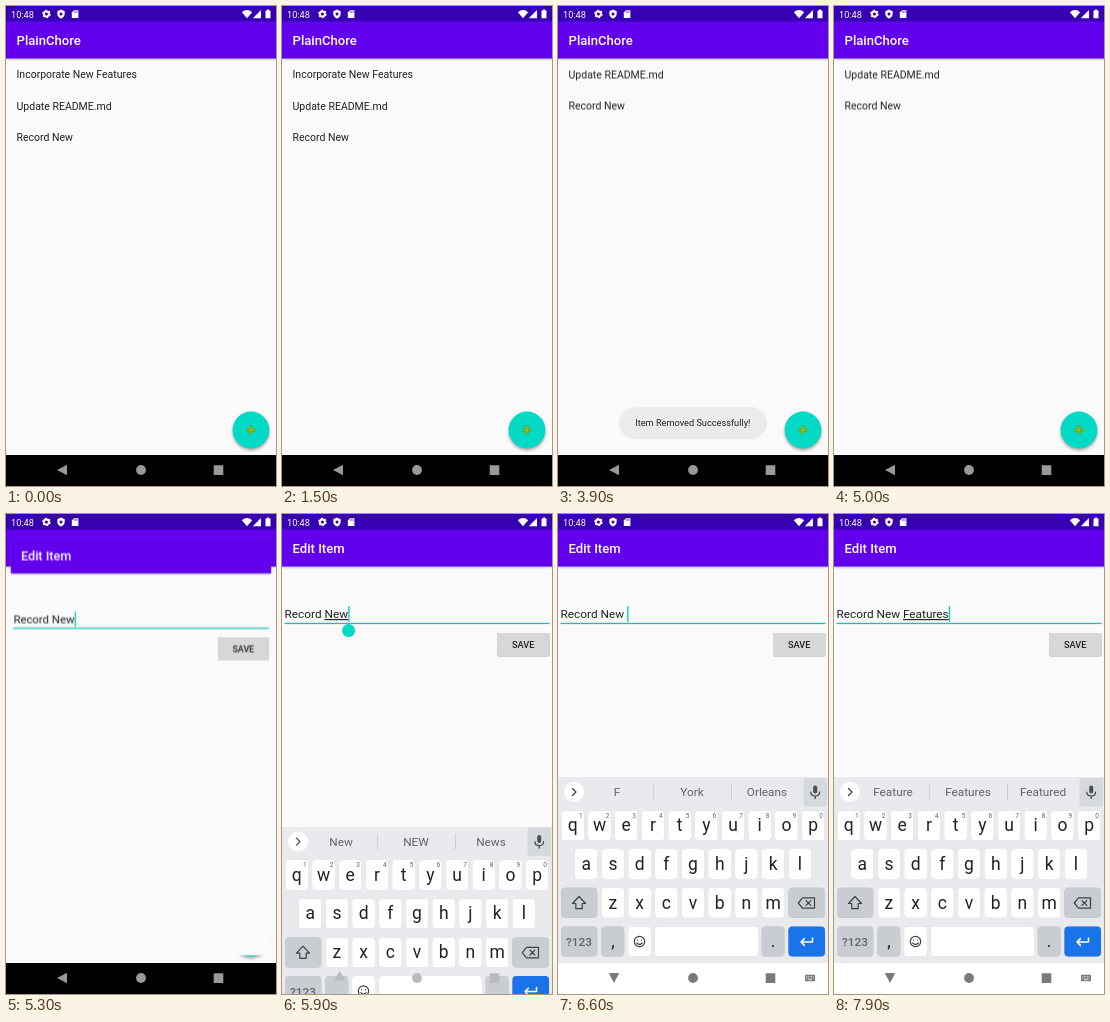
These frames come from a looping animation (270 px wide and 480 px high, 8000 ms). An HTML page:

```html
<!DOCTYPE html>
<html lang="en">
<head>
<meta charset="utf-8">
<title>Todo demo</title>
<style>
  html, body { margin: 0; width: 100%; height: 100%; overflow: hidden; background: #fafafa; }
  svg { display: block; width: 100%; height: 100%; font-family: Roboto, sans-serif; }
  text { white-space: pre; }
  .mid { text-anchor: middle; }
  .bar { filter: drop-shadow(0 1px 1px #0004); }
  .title { font-size: 13.1px; font-weight: 500; fill: #fff; }
  .rows { font-size: 10.5px; fill: #212121; }
  .letter { font-size: 17.5px; fill: #202124; }
  .hint { font-size: 6.5px; fill: #5f6368; }
  .suggest { font-size: 11.8px; fill: #5f6368; }
  .key { filter: drop-shadow(0 .7px .2px #0003); }
  .line { fill: none; stroke: #3c4043; stroke-width: 1.2; stroke-linejoin: round; stroke-linecap: round; }

  .first, .rest, .toast, .edit, .handle, .keyboard, .nav, .back, .switch {
    animation: 8s linear infinite;
  }
  .first { animation-name: first; }
  .rest { animation-name: rest; }
  .toast { animation-name: toast; }
  .edit { animation-name: edit; transform-origin: 135px 240px; }
  .handle { animation-name: handle; }
  .keyboard { animation-name: keyboard; }
  .nav { animation-name: nav; }
  .back { animation-name: back; transform-box: fill-box; transform-origin: center; }
  .switch { animation-name: switch; }

  @keyframes first { 0%, 26.9% { opacity: 1; } 28.3%, 100% { opacity: 0; } }
  @keyframes rest {
    0%, 28.3% { transform: none; animation-timing-function: cubic-bezier(.37, 0, .63, 1); }
    31.4%, 100% { transform: translateY(-31.5px); }
  }
  @keyframes toast {
    0%, 28.75% { opacity: 0; }
    30.6%, 53.1% { opacity: 1; }
    59.4%, 100% { opacity: 0; }
  }
  @keyframes edit {
    0%, 64.4% { opacity: 0; transform: scale(.85); animation-timing-function: ease-out; }
    65.6% { opacity: 1; transform: scale(.95); animation-timing-function: ease-out; }
    69.4%, 100% { opacity: 1; transform: none; }
  }
  @keyframes handle {
    0%, 71.2% { opacity: 0; }
    71.21%, 78.7% { opacity: 1; }
    78.71%, 100% { opacity: 0; }
  }
  @keyframes keyboard {
    0%, 72.6% { transform: translateY(217px); }
    73.75% { transform: translateY(50px); }
    75% { transform: translateY(8px); }
    76.2%, 100% { transform: none; }
  }
  @keyframes nav {
    0%, 72.6% { fill: #999; }
    73.75% { fill: #b8babd; }
    76.2%, 100% { fill: #7a7a7a; }
  }
  @keyframes back { 0%, 72.6% { transform: none; } 76.2%, 100% { transform: rotate(-90deg); } }
  @keyframes switch { 0%, 74.9% { opacity: 0; } 76.2%, 100% { opacity: 1; } }
</style>
</head>
<body>
<svg viewBox="0 0 270 480">
  <rect width="270" height="480" fill="#fafafa"/>

  <g class="list">
    <rect class="bar" y="15" width="270" height="37.5" fill="#6200ee"/>
    <text class="title" x="10.5" y="39">PlainChore</text>
    <g class="rows">
      <text class="first" x="10.5" y="72.4">Incorporate New Features</text>
      <g class="rest">
        <text x="10.5" y="103.9">Update README.md</text>
        <text x="10.5" y="135.4">Record New</text>
      </g>
    </g>
    <circle cx="245" cy="424" r="18.4" fill="#03dac5" style="filter:drop-shadow(0 2px 1.8px #0005)"/>
    <path d="M245 419.5v9M240.5 424h9" stroke="#5f9a32" stroke-width="3"/>
    <path d="M245 420.2v7.6M241.2 424h7.6" stroke="#9bbd12" stroke-width="1.6"/>
    <g class="toast">
      <rect x="61" y="401" width="148" height="32" rx="16" fill="#ebebeb"/>
      <text class="mid" x="134.8" y="420.2" font-size="9.2" fill="#212121">Item Removed Successfully!</text>
    </g>
  </g>

  <g class="edit">
    <rect y="15" width="270" height="434" fill="#fafafa"/>
    <rect class="bar" y="15" width="270" height="37.5" fill="#6200ee"/>
    <text class="title" x="10.5" y="39">Edit Item</text>
    <text id="field" x="2.6" y="104" font-size="11.8" fill="#212121"><tspan id="plain"></tspan><tspan id="word" text-decoration="underline"></tspan></text>
    <rect x="2.6" y="108.8" width="265" height="1.3" fill="#10c4b3"/>
    <rect id="cursor" y="92" width="1.3" height="16" fill="#03cdb9"/>
    <path class="handle" d="M66.6 109.3l4.6 2.7a6.5 6.5 0 1 1-9.2 0z" fill="#03dac5"/>
    <rect x="215" y="119" width="52.5" height="23.5" rx="1.4" fill="#d6d7d7" style="filter:drop-shadow(0 .8px .7px #0005)"/>
    <text class="mid" x="241.2" y="134" font-size="9.2" font-weight="500" fill="#212121">SAVE</text>
  </g>

  <g class="status" fill="#fff">
    <rect width="270" height="15.5" fill="#3700b3"/>
    <text x="5" y="11.6" font-size="9.2">10:48</text>
    <circle cx="40.4" cy="8" r="2.5" fill="none" stroke="#fff" stroke-width="1.9"/>
    <circle cx="40.4" cy="8" r="3.7" fill="none" stroke="#fff" stroke-width="1.2" stroke-dasharray="1.94"/>
    <path d="M55 3.6l3.7 1.6v2.6q0 3.3-3.7 4.7-3.7-1.4-3.7-4.7V5.2z"/>
    <circle cx="55" cy="8" r="1.5" fill="#3700b3"/>
    <path d="M68 4.2h4.4v7.8h-6.6V6.4z"/>
    <path d="M68.4 5.2v1.6m1.3-1.6v1.6m1.3-1.6v1.6" stroke="#3700b3" stroke-width=".6"/>
    <path d="M235.8 6.3q5.2-4.4 10.4 0L241 12.3z"/>
    <path d="M255 4v8.2h-8.2z"/>
    <path d="M261 3.6h2v.9h1.5v7.7h-5V4.5h1.5z"/>
  </g>

  <rect y="449" width="270" height="31"/>
  <g class="keyboard">
    <rect y="263" width="270" height="186.5" fill="#e8eaed"/>
    <rect y="449" width="270" height="31" fill="#fff"/>
    <circle cx="16" cy="278" r="10" fill="#fff"/>
    <path class="line" d="M14.5 274.5l3.5 3.5-3.5 3.5"/>
    <path d="M95.5 270v16M173.5 270v16" stroke="#c8cbcf" stroke-width=".8"/>
    <g class="suggest mid" id="suggestions">
      <text x="59" y="282.3"></text><text x="134" y="282.3"></text><text x="209" y="282.3"></text>
    </g>
    <rect x="245.5" y="264" width="23.5" height="28.5" rx="2" fill="#d5d8dc"/>
    <rect x="255.2" y="271.5" width="4" height="8" rx="2" fill="#4a4d51"/>
    <path class="line" d="M252.8 278q0 4 4.4 4t4.4-4M257.2 282v2.6"/>
    <g id="keys"></g>
    <path class="line" d="M21 382.5l-6.5 7h3.3v5.2h6.4v-5.2h3.3z"/>
    <path class="line" d="M244.5 383.8h12v10.4h-12l-4.2-5.2zM248 386.6l4.8 4.8m0-4.8l-4.8 4.8"/>
    <circle class="line" cx="81.5" cy="427.5" r="5.2"/>
    <path class="line" d="M79.5 426v.1m4-.1v.1M78.8 429q2.7 2.8 5.4 0"/>
    <path class="line" style="stroke:#fff;stroke-width:1.5" d="M254.5 424v4h-11.5m3.4-3.4l-3.4 3.4 3.4 3.4"/>
  </g>

  <g class="nav">
    <path class="back" d="M51 464l10-5.3v10.6z"/>
    <circle cx="135" cy="464" r="4.9"/>
    <rect x="207.7" y="459.3" width="9.6" height="9.6" rx=".5"/>
    <g class="switch">
      <rect x="247" y="460.8" width="10" height="6.4" rx=".7"/>
      <path d="M248.2 462.6h7.6M248.2 464.2h7.6" stroke="#fff" stroke-width=".7" stroke-dasharray=".9 .7"/>
      <path d="M249.8 465.8h4.4" stroke="#fff" stroke-width=".7"/>
    </g>
  </g>
</svg>

<script>
const find = id => document.getElementById(id);
const WHITE = '#fff', GRAY = '#c9ccd1', BLUE = '#1a73e8';

const key = (x, y, width, fill = WHITE) =>
  `<rect class="key" x="${x}" y="${y}" width="${width}" height="30" rx="4" fill="${fill}"/>`;
const label = (x, y, text, style = 'letter') =>
  `<text class="mid ${style}" x="${x}" y="${y}">${text}</text>`;

const letterRow = (letters, firstX, y) => [...letters].map((letter, i) => {
  const x = firstX + i * 26.7;
  return key(x - 11.4, y, 22.8) + label(x, y + 20.8, letter);
}).join('');

const hints = [...'1234567890']
  .map((digit, i) => label(22.8 + i * 26.7, 303.6, digit, 'hint')).join('');

find('keys').innerHTML =
  letterRow('qwertyuiop', 14.8, 296.5) + hints +
  letterRow('asdfghjkl', 28.2, 335) +
  letterRow('zxcvbnm', 54.9, 373.8) +
  key(3, 373.8, 36.3, GRAY) + key(230.4, 373.8, 36.6, GRAY) +
  key(3, 412.5, 36.3, GRAY) + key(43.4, 412.5, 22.8, GRAY) + key(70.1, 412.5, 22.8) +
  key(96.8, 412.5, 103.2) + key(203.7, 412.5, 22.8, GRAY) + key(230.4, 412.5, 36.6, BLUE) +
  '<g font-weight="500">' + label(21, 432, '?123', 'suggest') + '</g>' +
  label(54.9, 433, ',') + label(215, 433, '.');

// [start in ms, finished text, word being composed]
const typing = [
  [0, 'Record New', ''],
  [5850, 'Record ', 'New'],
  [6300, 'Record New ', ''],
  ...[6700, 7000, 7100, 7300, 7400, 7500, 7600, 7700]
    .map((start, i) => [start, 'Record New ', 'Features'.slice(0, i + 1)])
];

const suggestions = [
  [0, 'New', 'NEW', 'News'],
  [6300, 'Year', 'York', 'Orleans'],
  [6550, 'F', 'York', 'Orleans'],
  [6750, 'F', 'For', 'First'],
  [7000, 'Fe', 'Feel', 'Feb'],
  [7150, 'Fear', 'Features', 'Feature'],
  [7500, 'Feature', 'Features', 'Featured']
];

const current = (steps, time) => steps.findLast(step => step[0] <= time + 1);
const setText = (node, text) => { if (node.textContent !== text) node.textContent = text; };

const clock = document.getAnimations()[0];

function render() {
  const time = (clock?.currentTime ?? performance.now()) % 8000;
  const [, plain, word] = current(typing, time);
  setText(find('plain'), plain);
  setText(find('word'), word);
  find('cursor').setAttribute('x', 2.8 + find('field').getComputedTextLength());

  const [, ...choices] = current(suggestions, time);
  [...find('suggestions').children].forEach((slot, i) => setText(slot, choices[i]));
  requestAnimationFrame(render);
}
render();
</script>
</body>
</html>
```
